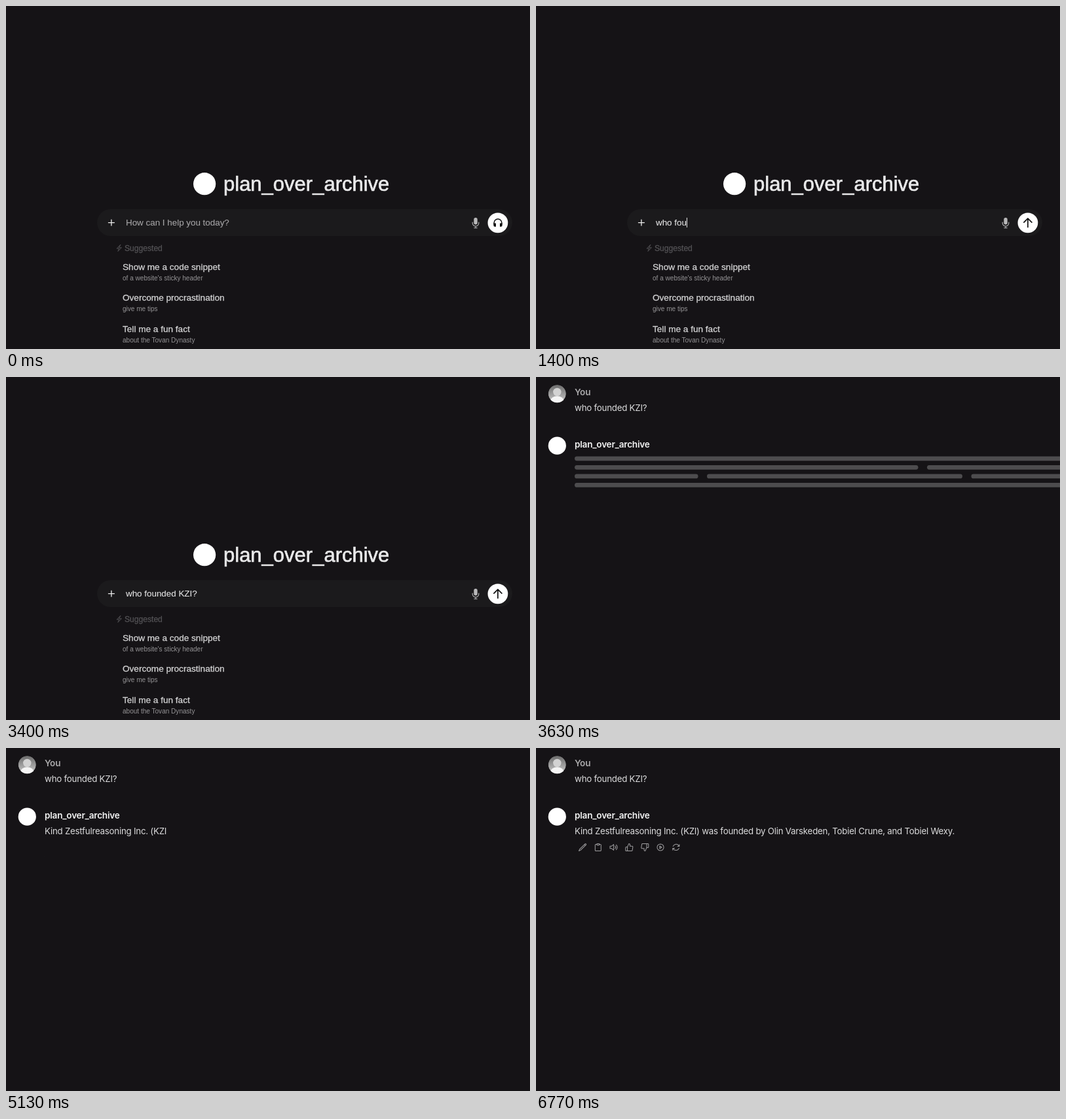
Recreate the animation shown at these times as an HTML page. Size 800x525 px, loop 7.73 s.

```html
<!DOCTYPE html>
<html lang="en">
<head>
<meta charset="utf-8">
<title>Chat demo</title>
<style>
  html, body { margin: 0; width: 100%; height: 100%; overflow: hidden; background: #151316; }
  svg { display: block; width: 800px; height: 525px; }
  text { white-space: pre; }
  #home { font-family: "Liberation Sans", Arial, sans-serif; }
  #chat { font: 13.3px Inter, sans-serif; letter-spacing: -.018em; fill: #dcdcdd; }
  .medium { stroke: currentColor; stroke-width: .3px; fill: currentColor; }
  .title { font-size: 31px; color: #e9e9ea; stroke-width: .7px; }
  .field { font-size: 13.4px; color: #e2e2e3; stroke-width: .12px; }
  .label { font-size: 12.1px; color: #525154; }
  .head { font-size: 13.6px; color: #d2d2d3; }
  .sub { font-size: 10.05px; fill: #949395; }
  .name { font-size: 13.6px; font-weight: 600; fill: #f3f3f3; }
  .icon { fill: none; stroke-linecap: round; stroke-linejoin: round; }
</style>
</head>
<body>
<svg viewBox="0 0 800 525">
  <defs>
    <linearGradient id="shade" x2="0" y2="1">
      <stop stop-color="#6c6c6c"/><stop offset="1" stop-color="#cbcbcb"/>
    </linearGradient>
    <clipPath id="round"><circle cx="32.3" cy="25.6" r="13.6"/></clipPath>
  </defs>

  <g id="home">
    <circle cx="303.1" cy="272.2" r="17.1" fill="#fff"/>
    <text class="medium title" x="332" y="282.7">plan_over_archive</text>

    <rect x="139" y="311" width="634" height="41" rx="20.5" fill="#1b1a1c"/>
    <path class="icon" d="M156.4 331.6h9M160.9 327.1v9" stroke="#eee" stroke-width="1.3"/>
    <text id="hint" class="medium field" x="183" y="336" style="color:#a3a2a4">How can I help you today?</text>
    <text id="typed" class="medium field" x="183" y="336"></text>
    <rect id="caret" y="324" width="1" height="15" fill="#e2e2e3"/>
    <rect x="714.3" y="324" width="5.4" height="10.4" rx="2.7" fill="#b9b9ba"/>
    <path class="icon" d="M712.2 331v1.2a4.8 4.8 0 0 0 9.6 0V331M717 337v2.6M714.8 339.7h4.4" stroke="#b9b9ba" stroke-width="1.1"/>
    <circle cx="750.9" cy="331.8" r="15.4" fill="#fff"/>
    <g id="voice">
      <path class="icon" d="M745.1 334v-2a5.9 5.9 0 0 1 11.8 0v2" stroke="#111" stroke-width="1.5"/>
      <path d="M744.4 332.6h3.6v5.2h-1.8a1.8 1.8 0 0 1-1.8-1.8zM757.6 332.6h-3.6v5.2h1.8a1.8 1.8 0 0 0 1.8-1.8z" fill="#111"/>
    </g>
    <path id="send" class="icon" d="M750.9 338.4v-13.2M744.9 331.2l6-6 6 6" stroke="#111" stroke-width="1.7"/>

    <path class="icon" d="M174.6 365.6l-5.4 5.6h3.6l-1.9 4.3 5.5-5.7h-3.6z" stroke="#525154"/>
    <text class="medium label" x="181" y="374.6">Suggested</text>
    <g id="suggestions"></g>
  </g>

  <g id="chat">
    <g clip-path="url(#round)">
      <circle cx="32.3" cy="25.6" r="13.6" fill="url(#shade)"/>
      <circle cx="32.3" cy="23" r="6.2" fill="#d2d2d2"/>
      <ellipse cx="32.3" cy="37" rx="10.5" ry="7.8" fill="#f5f5f5"/>
    </g>
    <text class="name" x="59" y="28" style="fill:#aaa9ab">You</text>
    <text x="59" y="51.7">who founded KZI?</text>
    <circle cx="32.3" cy="105.2" r="13.6" fill="#fff"/>
    <text class="name" x="59" y="107.7">plan_over_archive</text>
    <g id="skeleton"></g>
    <text id="answer" x="59" y="131.5"></text>
    <g id="actions" class="icon" stroke="#a09fa1" stroke-width="1.8"></g>
  </g>
</svg>
<script>
const LOOP = 7730, SUBMIT = 3630, ANSWER = 5130, DONE = 5330;
const question = 'who founded KZI?';
const reply = 'Kind Zestfulreasoning Inc. (KZI) was founded by Olin Varskeden, Tobiel Crune, and Tobiel Wexy.';
const keyTimes = [770, 970, 1030, 1170, 1250, 1330, 1400, 1480, 1550, 1630,
                  1800, 2000, 2300, 2470, 2600, 2900];
const replyStart = 31, replySteps = 5;

const $ = id => document.getElementById(id);
const show = (id, on) => { $(id).style.display = on ? '' : 'none'; };

$('suggestions').innerHTML = [
  ['Show me a code snippet', "of a website's sticky header"],
  ['Overcome procrastination', 'give me tips'],
  ['Tell me a fun fact', 'about the Tovan Dynasty'],
].map(([head, sub], i) => `<g transform="translate(178 ${403.6 + i * 47.5})">
  <text class="medium head">${head}</text><text class="sub" y="16.2">${sub}</text></g>`).join('');

$('skeleton').innerHTML = [[59, 820], [59, 583.5, 597, 820], [59, 247.5, 261, 651, 664.5, 820], [59, 820]]
  .map((edges, row) => edges.map((x, i) => i % 2 ? '' :
    `<rect x="${x}" y="${121.4 + row * 13.55}" width="${edges[i + 1] - x}" height="6.8" rx="3.4"/>`).join('')).join('');

const thumb = 'M14 9V5a3 3 0 0 0-3-3l-4 9v11h11.3a2 2 0 0 0 2-1.7l1.4-9a2 2 0 0 0-2-2.3zM7 22H4a2 2 0 0 1-2-2v-7a2 2 0 0 1 2-2h3';
$('actions').innerHTML = [
  'M17 4.5l1.7-1.7a1.9 1.9 0 0 1 2.7 2.7L6.8 19.8l-4.5 1.9 1.9-4.5zM17 4.5l2.6 2.6',
  'M9 4H6a2 2 0 0 0-2 2v14a2 2 0 0 0 2 2h12a2 2 0 0 0 2-2V6a2 2 0 0 0-2-2h-3M9 2h6v4H9z',
  'M2 9h4l6-5v16l-6-5H2zM16 8.5a5 5 0 0 1 0 7M19 5.5a9 9 0 0 1 0 13',
  thumb,
  thumb,
  'M12 3a9 9 0 0 1 0 18a9 9 0 0 1 0-18zM10 8.5l5.5 3.5-5.5 3.5z',
  'M16 9.3h5v-5M8 14.7H3v5M3.8 9.5a9 9 0 0 1 14.3-3.6L21 9.3M3 14.7l3 3.3a9 9 0 0 0 14.2-3.5',
].map((d, i) => `<path d="${d}" transform="translate(${71 + i * 23.8} 152)
  rotate(${i === 4 ? 180 : 0}) scale(.56) translate(-12 -12)"/>`).join('');

function draw() {
  const t = performance.now() % LOOP;
  const typed = keyTimes.filter(k => t >= k).length;
  show('home', t < SUBMIT);
  show('chat', t >= SUBMIT);

  if (t < SUBMIT) {
    show('hint', !typed);
    show('voice', !typed);
    show('send', typed);
    show('caret', t >= 230 && t < 3400);
    $('typed').textContent = question.slice(0, typed);
    $('caret').setAttribute('x', 183 + (typed && $('typed').getComputedTextLength()));
  } else {
    const step = Math.min(replySteps, Math.floor((t - ANSWER) / 33.4 + .01));
    const length = Math.round(replyStart + (reply.length - replyStart) * step / replySteps);
    show('skeleton', t < ANSWER);
    $('skeleton').setAttribute('fill', t < 4170 ? '#4d4c4e' : '#4a494b');
    $('answer').textContent = t < ANSWER ? '' : reply.slice(0, length);
    show('actions', t >= DONE);
  }
  requestAnimationFrame(draw);
}
draw();
</script>
</body>
</html>
```
